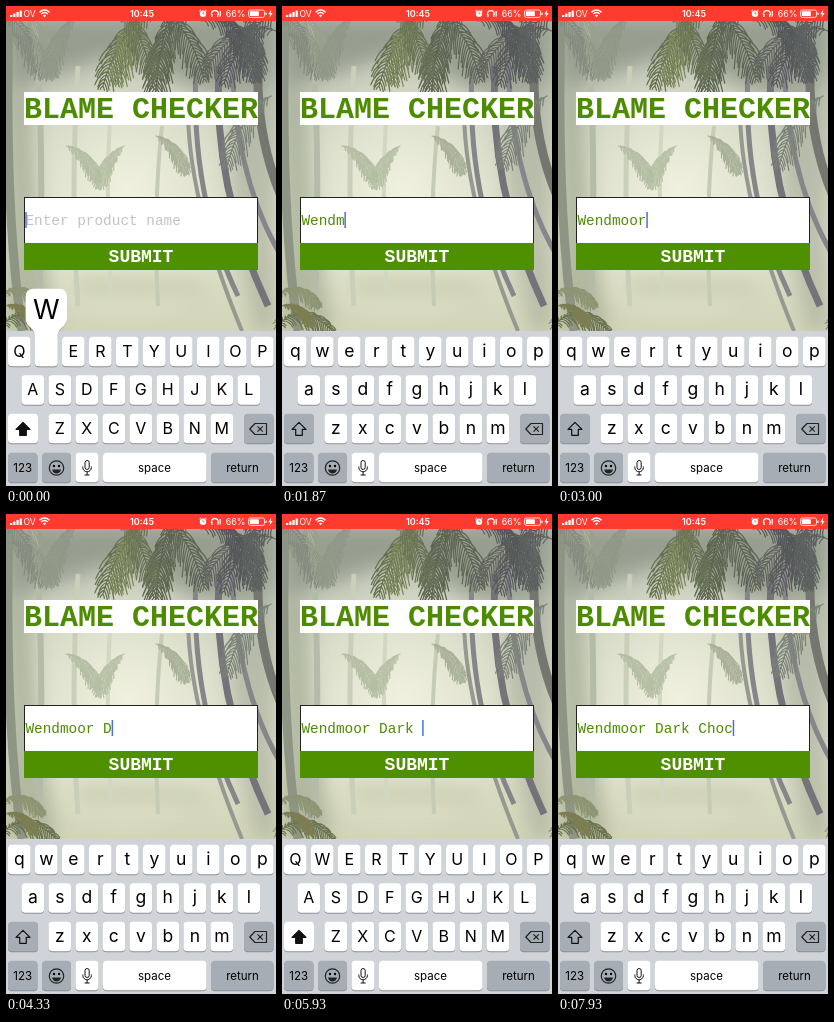
Animation of 270x480 px, one loop 8 s. Source, as an HTML page:

```html
<!DOCTYPE html>
<html lang="en">
<head>
<meta charset="utf-8">
<title>Product search</title>
<style>
html, body { margin: 0; width: 100%; height: 100%; overflow: hidden; background: #d0d4d8; }
svg { display: block; width: 270px; height: 480px; }
text { white-space: pre; }
.mono { font-family: "Liberation Mono", monospace; }
.ui { font-family: Inter, Roboto, sans-serif; text-anchor: middle; }
</style>
</head>
<body>
<svg id="stage" viewBox="0 0 270 480" xmlns="http://www.w3.org/2000/svg"></svg>
<script>
const LOOP = 8000;
const BRAND = 'Wendmoor';
const GREEN = '#4d8c00', GRAY = '#a6adb4';
const SHIFT = '⇧', BACK = '⌫';
const COMMIT = 70, RELEASE = 130;
const SUGGEST_AT = 2330;
const CHAR = 8.64, TEXT_X = 19.4;

const presses = [
  [0, 'W'], [670, 'e'], [1070, 'n'], [1400, 'd'], [1730, 'm'], [2130, 'o'],
  [2600, ' '], [2870, BACK], [3400, ' '], [3870, SHIFT],
  [4200, 'D'], [4470, 'a'], [4730, 'r'], [5130, 'k'], [5470, ' '], [5870, SHIFT],
  [6330, 'C'], [6670, 'h'], [7070, 'o'], [7400, 'c']
];

const rows = [['qwertyuiop', 13.3, 330.7], ['asdfghjkl', 26.8, 369.2], ['zxcvbnm', 53.8, 407.7]];
const keys = {};
for (const [letters, x0, y] of rows)
  [...letters].forEach((ch, i) => keys[ch] = { x: x0 + 27 * i, y });

const rect = (x, y, w, h, fill, extra = '') =>
  `<rect x="${x}" y="${y}" width="${w}" height="${h}" fill="${fill}" ${extra}/>`;
const line = (d, stroke, width, extra = '') =>
  `<path d="${d}" fill="none" stroke="${stroke}" stroke-width="${width}" ${extra}/>`;
const label = (x, y, size, str, extra = '') =>
  `<text class="ui" x="${x}" y="${y}" font-size="${size}" ${extra}>${str}</text>`;
const keycap = (x, y, w, fill, id = '') =>
  rect(x, y + 1, w, 29.5, '#8b9094', 'rx="3.8"') +
  rect(x, y, w, 29.5, fill, `rx="3.8" ${id && `id="${id}"`}`);

// A palm leaf: the spine bends towards the ground, thin leaflets hang from it.
function frond(x, y, angle, length, color, bend = 0.9) {
  const n = 24, step = length / n;
  let d = '', a = angle;
  for (let i = 0; i < n; i++) {
    const qx = x + Math.cos(a) * step, qy = y + Math.sin(a) * step;
    d += `M${x.toFixed(1)} ${y.toFixed(1)}L${qx.toFixed(1)} ${qy.toFixed(1)}`;
    const leaf = length * 0.3 * Math.sin(Math.PI * (i + 3) / (n + 4)) * (0.8 + 0.2 * Math.sin(i * 2.4));
    for (const side of [-0.8, 0.8]) {
      const dx = Math.cos(a + side) * leaf * 0.8, dy = Math.sin(a + side) * leaf * 0.7;
      d += `M${qx.toFixed(1)} ${qy.toFixed(1)}q${(dx * 0.7).toFixed(1)} ${(dy * 0.6).toFixed(1)} ${dx.toFixed(1)} ${(dy + leaf * 0.5).toFixed(1)}`;
    }
    x = qx; y = qy;
    a += (Math.PI / 2 - a) * bend / n;
  }
  return line(d, color, 1.2, 'stroke-linecap="round"');
}

function forest() {
  const trunks = [
    ['M72 60Q64 190 72 300', '#c9cfb9', 5], ['M104 110Q99 200 105 290', '#d2d7c2', 4],
    ['M156 120Q147 200 152 300', '#c5cbb5', 4], ['M28 15Q40 130 32 325', '#b4bba8', 6],
    ['M3 15Q-2 200 16 325', '#8f9585', 9],
    ['M182 95Q180 190 236 325', '#96998f', 4], ['M190 60Q184 190 232 290', '#85868a', 5],
    ['M213 60Q206 180 262 300', '#747379', 7], ['M226 50Q228 170 275 250', '#85858a', 5],
    ['M252 60Q250 130 275 190', '#75766f', 9]
  ];
  const leaves = [
    [-8, 30, -0.2, 75, '#8b9482'], [-5, 5, 0.5, 80, '#838b7f'], [20, 5, 0.9, 70, '#99a18e'],
    [70, 10, 2.4, 65, '#8f9786'], [118, 140, 2.6, 50, '#b7c1a5'], [60, 140, 0.2, 50, '#b4bea3'],
    [150, 130, 0.3, 50, '#a9b299'], [265, 90, 2.6, 85, '#7c8277'],
    [150, 5, 2.7, 95, '#65704f'], [140, -2, 2.2, 85, '#7b8659'], [165, 5, 1.9, 90, '#59634a'],
    [185, 0, 2.4, 90, '#606957'], [110, 0, 0.7, 80, '#697456'], [150, 0, 0.5, 90, '#5d6553'],
    [270, 25, 3.5, 90, '#626460'], [275, 5, 2.8, 95, '#58595a'], [195, 15, -0.2, 80, '#5c5e5b'],
    [210, 5, 0.6, 80, '#54575a'], [240, 0, 1.3, 75, '#5e6260']
  ];
  const undergrowth = [
    [-4, 290, -0.9, 50, '#8d9473'], [-5, 325, -1.3, 70, '#69734f'], [0, 300, -0.3, 40, '#7c7d52'],
    [8, 335, -0.9, 50, '#566044'], [30, 335, -0.8, 40, '#858f6c'],
    [275, 325, -2.2, 50, '#838a6b'], [270, 340, -1.8, 45, '#6f775a']
  ];
  const bend = leaf => frond(...leaf, 1.4);
  return `<g clip-path="url(#photo)">` +
    rect(0, 15, 270, 310, 'url(#sky)') + rect(0, 15, 270, 310, 'url(#glow)') +
    `<g filter="url(#haze)">` +
    `<path d="M0 15H270V75Q210 100 165 70T85 55T0 85Z" fill="#7d8476" opacity=".55"/>` +
    `<path d="M0 85H24Q30 200 50 325H0Z" fill="#98a189" opacity=".6"/>` +
    `<path d="M225 80H270V325H250Q215 200 225 80Z" fill="#a0a695" opacity=".55"/>` +
    `<path d="M60 272Q130 262 205 276L190 290H80Z" fill="#bcc2a0" opacity=".5"/></g>` +
    `<g filter="url(#soft)">` + trunks.map(t => line(...t)).join('') +
    leaves.map(bend).join('') + undergrowth.map(bend).join('') + '</g></g>';
}

function statusBar() {
  let s = rect(0, 0, 270, 15, '#ff3b30');
  for (let i = 0; i < 4; i++) s += rect(4 + i * 3.2, 9 - i * 1.5, 2.3, 2 + i * 1.5, '#fff', 'rx=".5"');
  return s + label(23.5, 10.8, 8.6, 'OV', 'fill="#fff"') +
    line('M33.5 6.2Q38.5 1.8 43.5 6.2M35.3 8Q38.5 5.2 41.7 8', '#fff', 1.4) +
    '<path d="M36.8 9.4Q38.5 8 40.2 9.4L38.5 11.2Z" fill="#fff"/>' +
    label(136, 10.9, 9, '10:45', 'fill="#fff" font-weight="600"') +
    '<circle cx="197" cy="7.7" r="3.2" fill="#fff"/>' +
    line('M197 5.7V7.8H198.5', '#ff3b30', 0.7) +
    line('M193.5 5L195 3.7M200.5 5L199 3.7', '#fff', 1) +
    line('M205.5 9V8A3.4 3.4 0 0 1 212.3 8V9M206 8V11M211.8 8V11M214.2 5V10.5', '#fff', 1.2) +
    label(229.5, 10.9, 8.8, '66%', 'fill="#fff"') +
    rect(242.5, 4, 16, 7.4, 'none', 'rx="1.8" stroke="#fff" stroke-width=".8"') +
    rect(243.8, 5.3, 9, 4.8, '#fff', 'rx=".7"') +
    rect(259.4, 6.4, 1.2, 2.6, '#fff', 'rx=".6"') +
    '<path d="M265.3 3.5L262.3 8.2H264.3L263.3 12L266.6 7H264.6Z" fill="#fff"/>';
}

function form() {
  return rect(18, 86, 234, 33, '#fff') +
    `<text class="mono" x="18" y="112" font-size="30" font-weight="700" fill="${GREEN}">BLAME CHECKER</text>` +
    rect(18.5, 191.5, 233, 46, '#fff', 'stroke="#222"') +
    rect(18, 237, 234, 27, '#4f9000') +
    `<text class="mono" x="135" y="256" font-size="18" font-weight="700" fill="#fff" text-anchor="middle">SUBMIT</text>` +
    rect(19, 206, 53, 16, '#cfd8e2', 'id="mark"') +
    `<text id="entry" class="mono" x="${TEXT_X}" y="218.5" font-size="14.4"></text>` +
    rect(0, 206, 1.5, 16, '#4c70d9', 'id="caret"') +
    `<g id="bubble"><path d="M18.5 222.5H95A8.7 8.7 0 0 1 95 240H18.5Z" fill="#fff" stroke="#cfcfcf" stroke-width=".8"/>
      <text class="mono" x="${TEXT_X}" y="236" font-size="14.4" fill="#3f69cf">${BRAND}</text>
      ${line('M92.2 228.8L97.2 233.8M97.2 228.8L92.2 233.8', '#b5b5b5', 1)}</g>`;
}

function keyboard() {
  let s = rect(0, 325, 270, 155, '#d0d4d8');
  for (const ch in keys) {
    const { x, y } = keys[ch];
    s += keycap(x - 11.3, y, 22.6, '#fff') + label(x, y + 20, 17, ch, `id="key-${ch}"`);
  }
  s += keycap(2, 407.7, 30, GRAY, 'shift') + keycap(238, 407.7, 29.5, GRAY, 'back') +
    '<path id="arrow" d="M17 416.3L24 423.3H20.3V429.3H13.7V423.3H10Z" stroke="#111" stroke-width="1.2" stroke-linejoin="round"/>' +
    line('M249 417.5H260.5V428.5H249L243.8 423ZM251.5 420.3L256.8 425.7M256.8 420.3L251.5 425.7', '#222', 1.2, 'stroke-linejoin="round"') +
    keycap(2, 446.7, 29.5, GRAY) + keycap(36, 446.7, 29, GRAY) + keycap(69.5, 446.7, 23, '#fff') +
    keycap(97, 446.7, 103.5, '#fff', 'space') + keycap(205, 446.7, 62.5, GRAY) +
    label(16.7, 466, 11.5, '123') + label(148.5, 466, 11.5, 'space') + label(236.5, 466, 11.5, 'return') +
    '<circle cx="50.5" cy="462" r="7.2" fill="none" stroke="#222" stroke-width="1.2"/>' +
    '<path d="M46 463.5H55Q54 467.5 50.5 467.5T46 463.5Z" fill="#222"/>' +
    '<circle cx="48" cy="460" r="1.2"/><circle cx="53" cy="460" r="1.2"/>' +
    rect(79, 454.5, 4.2, 9, '#fff', 'rx="2.1" stroke="#111"') +
    line('M76.8 460.5V461.5A4.3 4.3 0 0 0 85.4 461.5V460.5M81.1 465.8V469M78.6 469H83.6', '#111', 1);
  const head = 'M-12.5 -48H12.5Q20.7 -48 20.7 -40V-19C20.7 -9 11.3 -10 11.3 0V26Q11.3 29.5 7.8 29.5H-7.8Q-11.3 29.5 -11.3 26V0C-11.3 -10 -20.7 -9 -20.7 -19V-40Q-20.7 -48 -12.5 -48Z';
  return s + `<g id="popup"><path d="${head}" fill="#777" opacity=".4" transform="translate(0 1)"/>
    <path d="${head}" fill="#fff"/>${label(0, -17.5, 27, '', 'id="popped"')}</g>`;
}

document.getElementById('stage').innerHTML = `<defs>
  <clipPath id="photo"><rect y="15" width="270" height="310"/></clipPath>
  <filter id="soft"><feGaussianBlur stdDeviation=".6"/></filter>
  <filter id="haze" x="-20%" y="-20%" width="140%" height="140%"><feGaussianBlur stdDeviation="9"/></filter>
  <linearGradient id="sky" x2="0" y2="1"><stop stop-color="#b3b9ac"/><stop offset=".35" stop-color="#cfd4c1"/><stop offset=".7" stop-color="#dfe2cb"/><stop offset="1" stop-color="#d3d5b9"/></linearGradient>
  <radialGradient id="glow" cx=".45" cy=".55" r=".45"><stop stop-color="#f0f1df"/><stop offset="1" stop-color="#f0f1df" stop-opacity="0"/></radialGradient>
</defs>` + forest() + statusBar() + form() + keyboard();

const $ = id => document.getElementById(id);
const show = (id, on) => $(id).setAttribute('visibility', on ? 'visible' : 'hidden');
const fill = (id, color) => $(id).setAttribute('fill', color);

function stateAt(t) {
  let text = '', upper = true, held = null;
  for (const [at, key] of presses) {
    if (t < at) break;
    if (t < at + RELEASE) held = key;
    if (key === SHIFT) upper = true;
    else if (t >= at + RELEASE) upper = false;
    if (t < at + COMMIT) continue;
    if (key === BACK) text = text.slice(0, -1);
    else if (key === ' ' && text.length < BRAND.length) text = BRAND + ' ';
    else if (key !== SHIFT) text += key;
  }
  const suggesting = t >= SUGGEST_AT && text.length === 6;
  return { text, upper, held, suggesting };
}

function render(t) {
  const { text, upper, held, suggesting } = stateAt(t);
  $('entry').textContent = text || 'Enter product name';
  fill('entry', text ? GREEN : '#c3c3c3');
  $('caret').setAttribute('x', TEXT_X + text.length * CHAR - 0.2);
  $('caret').setAttribute('opacity', t >= 1200 && t < 1400 ? 0.55 : 1);
  show('mark', suggesting);
  show('bubble', suggesting);

  for (const ch in keys) {
    const el = $('key-' + ch);
    el.textContent = upper ? ch.toUpperCase() : ch;
    el.setAttribute('font-size', upper ? 16 : 17.5);
  }
  fill('shift', upper ? '#fff' : GRAY);
  fill('arrow', upper ? '#111' : 'none');
  fill('space', held === ' ' ? GRAY : '#fff');
  fill('back', held === BACK ? '#fff' : GRAY);

  const key = held && keys[held.toLowerCase()];
  show('popup', !!key);
  if (key) {
    $('popup').setAttribute('transform', `translate(${key.x} ${key.y})`);
    $('popped').textContent = held;
  }
}

const start = performance.now();
function tick() {
  render((performance.now() - start) % LOOP);
  requestAnimationFrame(tick);
}
tick();
</script>
</body>
</html>
```
